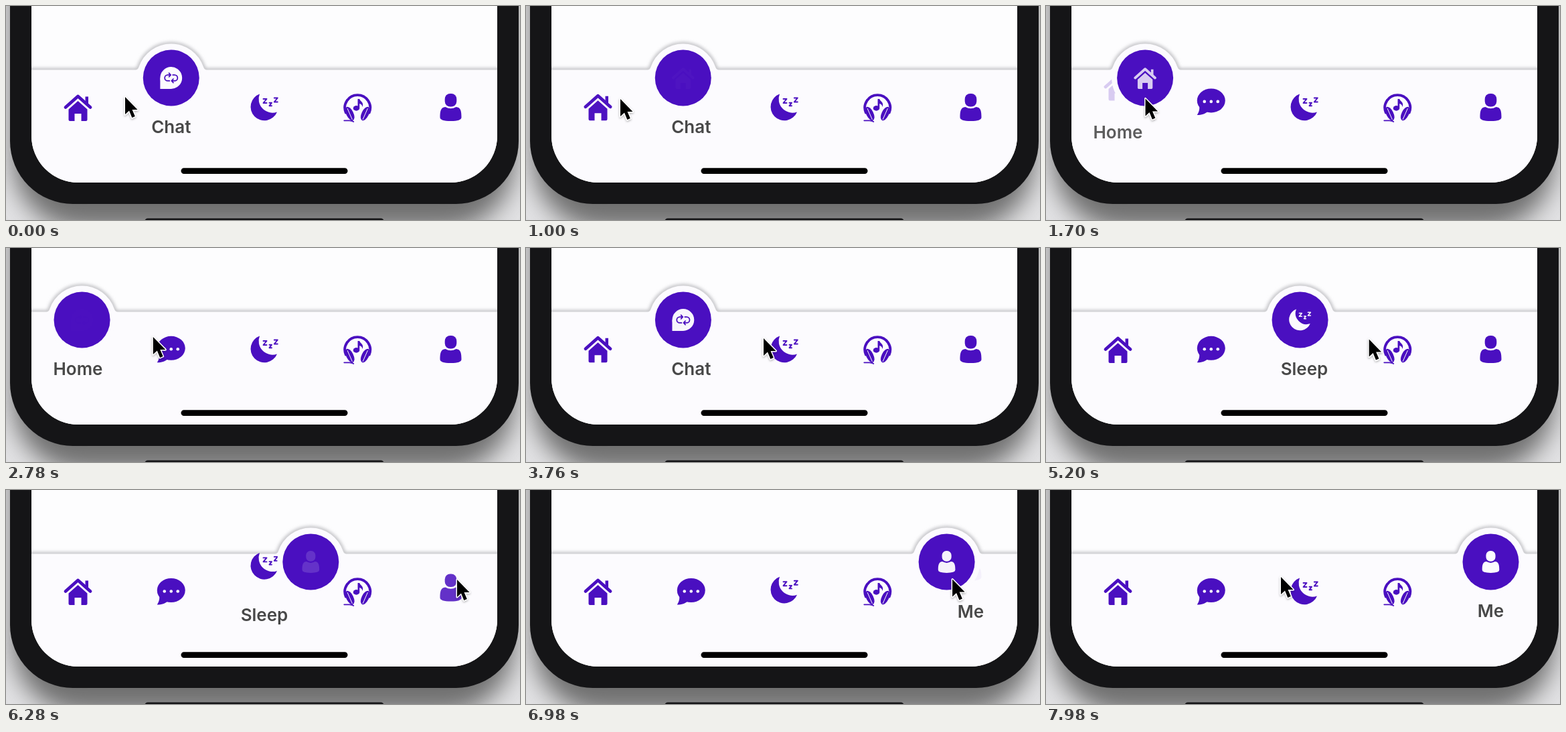
Animation of 768 by 320 pixels, one loop 8 s. Source, as an HTML page:

```html
<!DOCTYPE html>
<html lang="en">
<head>
<meta charset="utf-8">
<title>Tab bar</title>
<style>
  html, body { margin: 0; width: 100%; height: 100%; overflow: hidden; background: #e2e2e4; }
  svg { display: block; width: 100%; height: 100%; }
  text { font: 600 26px Inter, Roboto, sans-serif; fill: #484848; text-anchor: middle; }
  .line { fill: none; stroke: currentColor; stroke-linecap: round; stroke-linejoin: round; }
  .slot, .disc { color: #4a0fc0; fill: #4a0fc0; --hole: #fcfbfe; }
  .badge { color: #fcfbfe; fill: #fcfbfe; --hole: #4a0fc0; }
</style>
</head>
<body>
<svg viewBox="0 0 768 320" xmlns="http://www.w3.org/2000/svg">
  <defs>
    <filter id="soft" x="-20%" y="-30%" width="140%" height="160%"><feGaussianBlur stdDeviation="18"/></filter>
    <filter id="glow" filterUnits="userSpaceOnUse" x="0" y="30" width="768" height="90"><feGaussianBlur stdDeviation="2.6"/></filter>
    <filter id="drop" x="-50%" y="-50%" width="200%" height="200%"><feDropShadow dx="0" dy="1.5" stdDeviation="1.5" flood-opacity=".3"/></filter>
    <clipPath id="screen"><rect x="38" y="-200" width="696" height="464" rx="70"/></clipPath>

    <g id="home">
      <path class="line" stroke-width="4.8" d="M-18.5 0L0-16.5L18.5 0"/>
      <path d="M11-16h4.500V-4l-4.500-4.500zM0-9.500L14 3V18.500q0 2-2 2H5V9.500H-5v11H-12q-2 0-2-2V3Z"/>
    </g>
    <g id="chat">
      <ellipse cy="-1.5" rx="21" ry="18"/>
      <path d="M-17.5 6C-17 13-19 17-21 20C-14 20-9 18-5 15Z"/>
      <g fill="var(--hole)"><circle cx="-10" r="2.3"/><circle r="2.3"/><circle cx="10" r="2.3"/></g>
    </g>
    <g id="cycle">
      <circle r="20.5"/>
      <path d="M-20.5 0V20.5H0Z"/>
      <g style="color:var(--hole)" class="line" stroke-width="2.2">
        <path id="turn" d="M-3 5.5H-6.500A5.500 5.500 0 0 1-6.500-5.500H-1.500M-4-9L-.8-5.500L-4-2"/>
        <use href="#turn" transform="rotate(180)"/>
      </g>
    </g>
    <g id="sleep">
      <path d="M-7-20A20.5 20.5 0 1 0 19 7A20.6 20.6 0 0 1-7-20Z"/>
      <path class="line" stroke-width="1.9" d="M-1.500-12.500h5l-5 6h5M7.500-6.800h3.500l-3.500 4.500h3.500M14.800-14h5l-5 6h5"/>
    </g>
    <g id="music">
      <path class="line" stroke-width="3.8" d="M-17.5 8A19 19 0 1 1 17.5 8"/>
      <ellipse rx="5.4" ry="11" transform="translate(-11.500 9.500) rotate(-26)"/>
      <ellipse rx="5.4" ry="11" transform="translate(11.500 9.500) rotate(26)"/>
      <path class="line" style="color:var(--hole)" stroke-width="1" d="M-15 2L-8 18M15 2L8 18"/>
      <path class="line" stroke-width="1.8" d="M-20 19.8H-12Q-8 20-6 21.5"/>
      <ellipse cx="-1.8" cy="1.4" rx="4.7" ry="3.8"/>
      <path d="M.3 2V-12.500h2.700C4-8.500 9.500-8.500 7.500-.5C6.500-4.500 4.500-5 3-5.500V2Z"/>
    </g>
    <g id="me">
      <rect x="-8.8" y="-20.500" width="17.600" height="19.500" rx="8"/>
      <path d="M-16 15C-16 6-15 0-8-.5Q0 4 8-.5C15 0 16 6 16 15Q16 20.500 0 20.500Q-16 20.500-16 15Z"/>
    </g>
  </defs>

  <rect width="768" height="320" fill="#e2e2e4"/>
  <rect x="10" y="-150" width="750" height="484" rx="104" fill="#707070" filter="url(#soft)"/>
  <rect x="207" y="317.5" width="358" height="20" rx="5" fill="#151517"/>
  <rect x="6" y="-200" width="760" height="496" rx="94" fill="#151517"/>
  <g clip-path="url(#screen)">
    <rect x="38" width="696" height="264" fill="#fdfdfe"/>
    <path id="edge" fill="none" stroke="#bcbcc0" stroke-width="5" filter="url(#glow)"/>
    <path id="bar" fill="#fcfbfe"/>
    <g id="tabs"></g>
    <g id="knob">
      <circle r="50" fill="#fcfbfe"/>
      <circle class="disc" r="42"/>
      <use id="badge" class="badge"/>
    </g>
    <rect x="261.5" y="242.3" width="249" height="8.6" rx="4.3" fill="#000"/>
  </g>
  <g id="cursor" filter="url(#drop)">
    <path d="M0 0V26L6 20.5L10.3 31L14.8 29L10.5 19H18.5Z" stroke="#fff" stroke-width="3" paint-order="stroke" stroke-linejoin="round"/>
  </g>
</svg>
<script>
const LOOP = 8000, MOVE = 1125;
const TOP = 107.5, REST = 151.5, DROP = REST - TOP, LABEL = 189.5;
const $ = id => document.getElementById(id);

const tabs = [['home', 'Home'], ['chat', 'Chat'], ['sleep', 'Sleep'], ['music', 'Music'], ['me', 'Me']]
  .map(([icon, name], i) => {
    const x = 107.5 + i * 139.25;
    const slot = add('use', { href: '#' + icon, class: 'slot' });
    const label = add('text', { x });
    label.textContent = name;
    return { x, slot, label, badge: icon === 'chat' ? '#cycle' : '#' + icon };
  });

// [tap time, tab index]
const taps = [[-MOVE, 1], [904, 0], [2732, 1], [4128, 2], [6001, 4]];

// [time, x, y]
const pointer = [
  [0, 178, 136], [700, 141, 139], [1500, 141, 139], [2500, 219, 133], [2900, 220, 133],
  [3760, 355, 135], [4080, 381, 138], [4800, 381, 138], [5800, 674, 134], [6700, 674, 134], [7980, 351, 130]
];

function add(tag, attrs) {
  const el = document.createElementNS('http://www.w3.org/2000/svg', tag);
  set(el, attrs);
  return $('tabs').appendChild(el);
}
function set(el, attrs) {
  for (const key in attrs) el.setAttribute(key, attrs[key]);
}
const clamp = v => Math.min(1, Math.max(0, v));
const mix = (a, b, k) => a + (b - a) * k;
const easeInOut = p => (1 - Math.cos(Math.PI * p)) / 2;
const move = (x, y) => `translate(${x} ${y})`;

function place(tab, y, alpha, labelY, labelAlpha) {
  set(tab.slot, { transform: move(tab.x, y), opacity: alpha });
  set(tab.label, { y: labelY, opacity: labelAlpha });
}

function drawBar(x) {
  const line = `M30 95.5H${x - 53}Q${x - 50} 95.5 ${x - 48.5} 91.7` +
    `A51 51 0 0 1 ${x + 48.5} 91.7Q${x + 50} 95.5 ${x + 53} 95.5H740`;
  set($('edge'), { d: line });
  set($('bar'), { d: line + 'V270H30Z' });
}

function drawCursor(t) {
  let i = 0;
  while (i < pointer.length - 2 && t >= pointer[i + 1][0]) i++;
  const [a, b] = [pointer[i], pointer[i + 1]];
  const k = easeInOut(clamp((t - a[0]) / (b[0] - a[0])));
  set($('cursor'), { transform: move(mix(a[1], b[1], k), mix(a[2], b[2], k)) });
}

function draw(t) {
  let n = taps.length - 1;
  while (taps[n][0] > t) n--;
  const p = clamp((t - taps[n][0]) / MOVE), e = easeInOut(p);
  const to = tabs[taps[n][1]];
  const from = n ? tabs[taps[n - 1][1]] : null;
  const x = mix(from ? from.x : to.x, to.x, p);

  for (const tab of tabs) place(tab, REST, 1, LABEL, 0);
  if (from) place(from, TOP + DROP * e, 1, LABEL + DROP * e, clamp(2 - 2.6 * e));
  place(to, REST - 38 * e, 1 - e, LABEL + DROP * (1 - e), clamp(2.6 * e - 1.2));

  drawBar(x);
  set($('knob'), { transform: move(x, TOP) });
  set($('badge'), { href: to.badge, transform: 'scale(.8)', opacity: e });
  drawCursor(t);
}

function tick() {
  draw(performance.now() % LOOP);
  requestAnimationFrame(tick);
}
tick();
</script>
</body>
</html>
```
